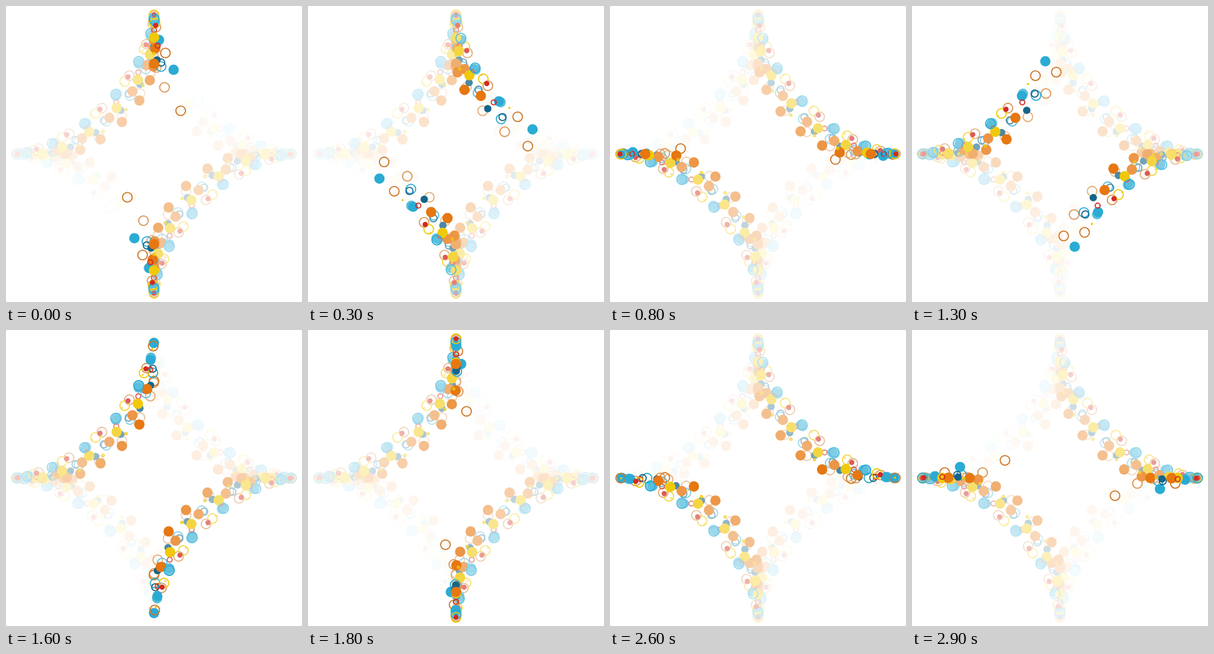
An HTML page with a canvas for the animation above (3 s loop, 480 px wide and 480 px high).

```html
<!DOCTYPE html>
<html lang="en">
<head>
<meta charset="utf-8">
<title>Astroid trails</title>
<style>
  html, body { margin: 0; width: 100%; height: 100%; overflow: hidden; background: #aaa; }
  canvas { display: block; width: 480px; height: 480px; border-radius: 2px; background: #fff; }
</style>
</head>
<body>
<canvas id="stage" width="480" height="480"></canvas>
<script>
const ctx = document.getElementById('stage').getContext('2d');

const LOOP = 3000;
const TICK = 100;             // display frame, ms
const STEPS_PER_TICK = 0.763; // movement steps per display frame
const STEP = 12;              // degrees per movement step
const START = 3;              // degrees past the top at time zero
const LEAD_IN = 12;           // steps already drawn at time zero
const MAX_AGE = 15;
const FADE = 0.225;

const BLUE = '#2babd3', ORANGE = '#e67711', YELLOW = '#f0c90a';
const NAVY = '#15658a', RED = '#d32a22', RUST = '#cc7728';

// astroid radius, angle offset, dot radius, colour, outline only
const dots = [
  [158.8, 37.4, 7.8, RUST, true],
  [221, 28.6, 8.4, BLUE],
  [224.5, 22.8, 7.8, RUST, true],
  [183.5, 20.4, 7.8, BLUE, true],
  [191, 20.2, 5.8, NAVY, true],
  [228, 19.4, 1.8, YELLOW],
  [219, 16, 8.2, BLUE],
  [176, 14.6, 6, NAVY],
  [191, 2, 8.4, YELLOW],
  [185, 10, 8.4, ORANGE],
  [204, 15, 4, RED, true],
  [226, 8.5, 7.8, YELLOW, true],
  [223, 4.2, 8, BLUE, true],
  [226, 10.2, 4.2, RED],
  [147, 0, 8.4, ORANGE],
  [164.3, -7.6, 1.8, YELLOW, true]
];

function drawDot([size, offset, r, color, outline], angle) {
  const a = (angle + offset) * Math.PI / 180;
  const x = 240 + size * Math.sin(a) ** 3;
  const y = 240 - size * Math.cos(a) ** 3;
  ctx.beginPath();
  ctx.arc(x, y, r, 0, Math.PI * 2);
  if (outline) {
    ctx.strokeStyle = color;
    ctx.stroke();
  } else {
    ctx.fillStyle = color;
    ctx.fill();
  }
}

function drawStep(step) {
  ctx.fillStyle = '#fff';
  ctx.fillRect(0, 0, 480, 480);
  ctx.lineWidth = 1.8;
  for (let s = Math.max(-LEAD_IN, step - MAX_AGE); s <= step; s++) {
    ctx.fillStyle = `rgba(255,255,255,${FADE})`;
    ctx.fillRect(0, 0, 480, 480);
    const angle = START + s * STEP;
    for (const dot of dots) {
      drawDot(dot, angle);
      drawDot(dot, angle + 180);
    }
  }
}

let shown = null;

function render(time) {
  const tick = Math.floor((time % LOOP) / TICK);
  const step = Math.floor(tick * STEPS_PER_TICK + 0.4);
  if (step !== shown) {
    shown = step;
    drawStep(step);
  }
}

function loop() {
  render(performance.now());
  requestAnimationFrame(loop);
}
loop();
</script>
</body>
</html>
```
